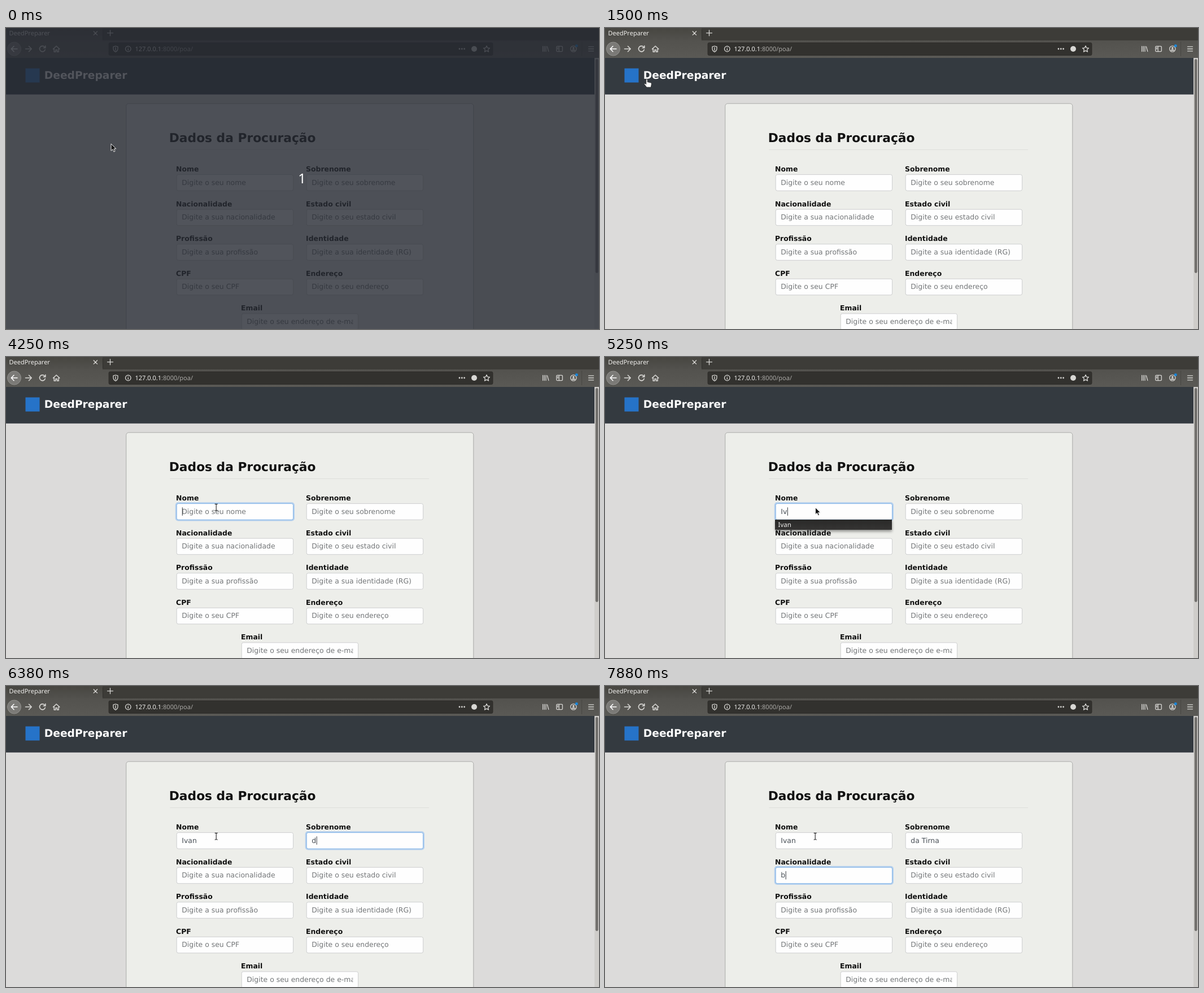
Recreate the animation shown at these times as an HTML page. Size 1050 by 533 pixels, loop 8 s.

```html
<!DOCTYPE html>
<html lang="pt">
<head>
<meta charset="utf-8">
<title>DeedPreparer</title>
<style>
  html, body { margin: 0; width: 100%; height: 100%; overflow: hidden; background: #dcdbda; }
  svg { display: block; text-rendering: geometricPrecision; }
  text { white-space: pre; }
  .ui { font: 11px "Noto Sans", "Open Sans", sans-serif; fill: #f0efed; }
  .page { font: 12.44px "DejaVu Sans", sans-serif; }
  .bold { font-weight: 700; fill: #101010; }
  .icon { fill: none; stroke: #d8d7d4; stroke-width: 1.3; stroke-linecap: round; stroke-linejoin: round; }
</style>
</head>
<body>
<svg width="1050" height="533" viewBox="0 0 1050 533">
  <defs>
    <linearGradient id="tab" x2="0" y2="1"><stop stop-color="#474641"/><stop offset="1" stop-color="#53524e"/></linearGradient>
    <linearGradient id="bar" x2="0" y2="1"><stop stop-color="#53524e"/><stop offset="1" stop-color="#5a5955"/></linearGradient>
    <linearGradient id="menu" x2="0" y2="1"><stop stop-color="#292928"/><stop offset="1" stop-color="#353433"/></linearGradient>
    <filter id="blur" x="-10%" y="-60%" width="120%" height="240%"><feGaussianBlur stdDeviation="2.5"/></filter>
    <clipPath id="mailClip"><rect x="417" y="500" width="197.5" height="33"/></clipPath>
  </defs>

  <!-- browser -->
  <rect width="1050" height="53" fill="#3d3c38"/>
  <rect width="171" height="23" fill="url(#tab)"/>
  <rect y="22" width="1050" height="31" fill="url(#bar)"/>
  <path d="M171.5 3V20" stroke="#302f2c"/>
  <text class="ui" x="5.5" y="13">DeedPreparer</text>
  <rect x="182" y="26" width="680" height="22.5" rx="2.5" fill="#32312e" stroke="#2b2a28" stroke-width=".8"/>
  <circle cx="14.5" cy="37" r="12" fill="#7b7a77" stroke="#93928f"/>
  <text class="ui" x="228.5" y="41">127.0.0.1<tspan fill="#aaa9a6">:8000/poa/</tspan></text>
  <g class="icon">
    <path d="M155.2 6l6.4 6.4M161.6 6l-6.4 6.4M179.5 8.8h10M184.5 3.8v10"/>
    <path d="M20 37H9.5M14 32.3L9.3 37l4.7 4.7" stroke="#fff" stroke-width="1.6"/>
    <path d="M34.5 37H45M40.5 32.3l4.7 4.7-4.7 4.7" stroke-width="1.6"/>
    <path d="M68.3 33.6a5 5 0 1 0 1 4.6M69.8 31.6v3.6h-3.6" stroke-width="1.6"/>
    <path d="M83.5 37.3l5.7-5.3 5.7 5.3M85.2 36.5v5.8h2.7v-3.5h2.6v3.5h2.7v-5.8" stroke-width="1.5"/>
    <path d="M194 32l4 1.2v3.6c0 2.6-1.6 4.3-4 5.5-2.4-1.2-4-2.9-4-5.5v-3.6zM194 34.5v5.2"/>
    <circle cx="216.3" cy="37" r="4.8"/><path d="M216.3 36.6v2.8M216.3 34.5v.1"/>
    <path d="M851 31.6l1.6 3.6 3.9.4-2.9 2.6.9 3.9-3.5-2-3.5 2 .9-3.9-2.9-2.6 3.9-.4z"/>
    <path d="M950.6 32.5v9M953.3 32.5v9M956 32.5v9M958.4 33l2.4 8.5"/>
    <rect x="974.8" y="32.3" width="10.6" height="9.4" rx="1.5"/><path d="M979.2 32.5v9M976.5 35h1M976.5 37h1"/>
    <circle cx="1004.8" cy="37" r="5.2"/>
    <path d="M1031.5 33.2h9M1031.5 37h9M1031.5 40.8h9"/>
  </g>
  <g fill="#d8d7d4">
    <circle cx="803" cy="37" r="1.4"/><circle cx="807.3" cy="37" r="1.4"/><circle cx="811.6" cy="37" r="1.4"/>
    <circle cx="829" cy="37" r="5"/>
    <circle cx="1004.8" cy="35.6" r="1.8"/><path d="M1001.3 40.3a3.6 3.2 0 0 1 7 0z"/>
  </g>
  <circle cx="1010.3" cy="31.5" r="2.5" fill="#1a86d9"/>
  <path d="M1019.5 24V50" stroke="#484743"/>

  <!-- page -->
  <rect y="53" width="1042" height="480" fill="#dcdbda"/>
  <rect y="53" width="1042" height="64.7" fill="#343a40"/>
  <rect x="1042" y="53" width="8" height="480" fill="#cfcdca"/>
  <rect x="1043.8" y="55" width="4.8" height="379" rx="2.4" fill="#72706d"/>
  <rect x="34.5" y="71.5" width="25" height="25" fill="#2673c8"/>
  <text class="page bold" x="67.8" y="90" style="font-size:18.67px;fill:#fff">DeedPreparer</text>
  <rect x="212.8" y="133.8" width="615" height="420" rx="4.5" fill="#edeeea" stroke="#a9aaa8"/>
  <text class="page bold" x="288.8" y="201.5" style="font-size:21.78px">Dados da Procuração</text>
  <path d="M290.5 215.5H749" stroke="#dededb"/>
  <g id="form" class="page"></g>

  <g id="list">
    <rect x="1" y="2" width="206" height="19" fill="#000" opacity=".4" filter="url(#blur)"/>
    <rect width="207" height="18" fill="url(#menu)"/>
    <text class="ui" x="5.5" y="13.3" style="font-size:11.5px"></text>
  </g>

  <g id="shade">
    <rect width="1050" height="533" fill="#262a32" opacity=".8"/>
    <text x="517.3" y="275" fill="#fff" style="font:24px 'Noto Sans',sans-serif">1</text>
  </g>

  <g id="pointer">
    <path id="arrow" d="M0 0V12.4L2.9 9.7 4.9 14.2 7 13.2 5.1 8.9H8.9Z" fill="#141414" stroke="#fff" stroke-width=".9"/>
    <path id="hand" d="M-1.2 1.2Q0-.8 1.2 1.2V5.6L7 6.8Q8.6 7.2 8.4 9L7.4 15H-.2L-4.4 9.6Q-4.6 7.8-2.8 8.4L-1.2 9.6Z" fill="#fff" stroke="#222" stroke-width=".8"/>
    <path id="beam" d="M-2.5-5.5Q0-6 0-4.3Q0-6 2.5-5.5M0-4.5V4.8M-2.5 6Q0 6.4 0 4.7Q0 6.4 2.5 6" fill="none" stroke="#222" stroke-width="1.1"/>
  </g>
</svg>
<script>
const LOOP = 8000, STEP = 125;
const $ = id => document.getElementById(id);

function add(parent, tag, attrs, text) {
  const node = document.createElementNS('http://www.w3.org/2000/svg', tag);
  for (const key in attrs) node.setAttribute(key, attrs[key]);
  if (text) node.textContent = text;
  return parent.appendChild(node);
}
const show = (node, on) => { node.style.display = on ? '' : 'none'; };

const labels = [
  ['Nome', 'o seu nome'], ['Sobrenome', 'o seu sobrenome'],
  ['Nacionalidade', 'a sua nacionalidade'], ['Estado civil', 'o seu estado civil'],
  ['Profissão', 'a sua profissão'], ['Identidade', 'a sua identidade (RG)'],
  ['CPF', 'o seu CPF'], ['Endereço', 'o seu endereço'],
  ['Email', 'o seu endereço de e-mail']
];

const fields = labels.map(([label, hint], i) => {
  const last = i === 8;
  const x = last ? 417 : 302 + (i % 2) * 230;
  const y = 259.5 + (i >> 1) * 61.55;
  const form = $('form');
  add(form, 'text', { class: 'bold', x: x - 1, y: y - 5.5 }, label);
  const glow = add(form, 'rect', { x: x - 2.3, y: y - 2.3, width: 211.3, height: 33.3, rx: 5, fill: '#b5d0ee' });
  const box = add(form, 'rect', { x: x + .2, y: y + .1, width: 206.4, height: 28.6, rx: 3, fill: '#fefefe' });
  const clip = add(form, 'g', last ? { 'clip-path': 'url(#mailClip)' } : {});
  const text = add(clip, 'text', { x: x + 9.3, y: y + 18.2 });
  const caret = add(form, 'rect', { y: y + 6.8, width: 1, height: 14.6, fill: '#33383d' });
  return { x, y, hint: 'Digite ' + hint, glow, box, text, caret };
});

// Pointer stops: time step, x, y, shape
const stops = [
  [0, 186, 205, 'arrow'],
  [6, 193, 196, 'arrow'], [7, 170, 150, 'arrow'], [8, 125, 90, 'hand'], [9, 82, 50, 'arrow'],
  [10, 58, 44, 'arrow'], [11, 48, 72, 'hand'], [12, 74, 90, 'hand'],
  [13, 95, 110, 'arrow'], [14, 135, 117, 'arrow'], [15, 164, 102, 'arrow'], [16, 170, 82, 'hand'],
  [17, 140, 67, 'arrow'], [18, 105, 63, 'arrow'], [19, 82, 76, 'hand'],
  [20, 71, 80, 'hand'], [21, 73, 79, 'hand'], [22, 82.5, 75.5, 'hand'], [23, 96, 88, 'hand'],
  [24, 128, 126, 'arrow'], [25, 167, 178, 'arrow'], [26, 187, 203, 'arrow'],
  [28, 196, 206, 'arrow'], [29, 236, 222, 'arrow'], [30, 294, 243, 'beam'], [31, 346, 258, 'beam'],
  [32, 372.2, 266, 'beam'], [42, 372.5, 266.5, 'arrow'], [51, 372.2, 266, 'beam'],
  [52, 372.5, 266.5, 'arrow'], [63, 372.2, 266, 'beam']
];

// Typing: time step, focused field, its length typed so far, suggestions open
const words = ['Ivan', 'da Tirna', 'b'];
const typing = [
  [0, -1, 0, 0], [34, 0, 0, 0], [40, 0, 1, 0], [42, 0, 2, 1], [44, 0, 3, 1], [45, 0, 4, 1],
  [48, 0, 4, 0], [49, 1, 0, 0], [51, 1, 1, 0], [52, 1, 2, 1], [54, 1, 3, 1], [55, 1, 4, 1],
  [57, 1, 5, 1], [58, 1, 6, 1], [59, 1, 8, 1], [60, 2, 0, 0], [63, 2, 1, 0]
];

const at = (table, step) => table.findLast(row => row[0] <= step);

function draw(time) {
  const step = time / STEP;
  const [, focus, count, open] = at(typing, step);

  fields.forEach((f, i) => {
    const value = i < focus ? words[i] : i === focus ? words[i].slice(0, count) : '';
    const active = i === focus;
    f.text.textContent = value || f.hint;
    f.text.setAttribute('fill', value ? '#495057' : '#737678');
    f.box.setAttribute('stroke', active ? '#80b3e6' : '#cdcecf');
    show(f.glow, active);
    show(f.caret, active);
    if (active) f.caret.setAttribute('x', f.x + 9.8 + (value ? f.text.getComputedTextLength() : 0));
  });

  show($('list'), open);
  if (open) {
    const f = fields[focus];
    $('list').setAttribute('transform', `translate(${f.x - 1} ${f.y + 28.5})`);
    $('list').querySelector('text').textContent = words[focus];
  }

  const [, x, y, shape] = at(stops, step);
  $('pointer').setAttribute('transform', `translate(${x} ${y})`);
  for (const id of ['arrow', 'hand', 'beam']) show($(id), id === shape);
  show($('shade'), step < 1);
}

const start = performance.now();
function tick() {
  draw((performance.now() - start) % LOOP);
  requestAnimationFrame(tick);
}
tick();
</script>
</body>
</html>
```
